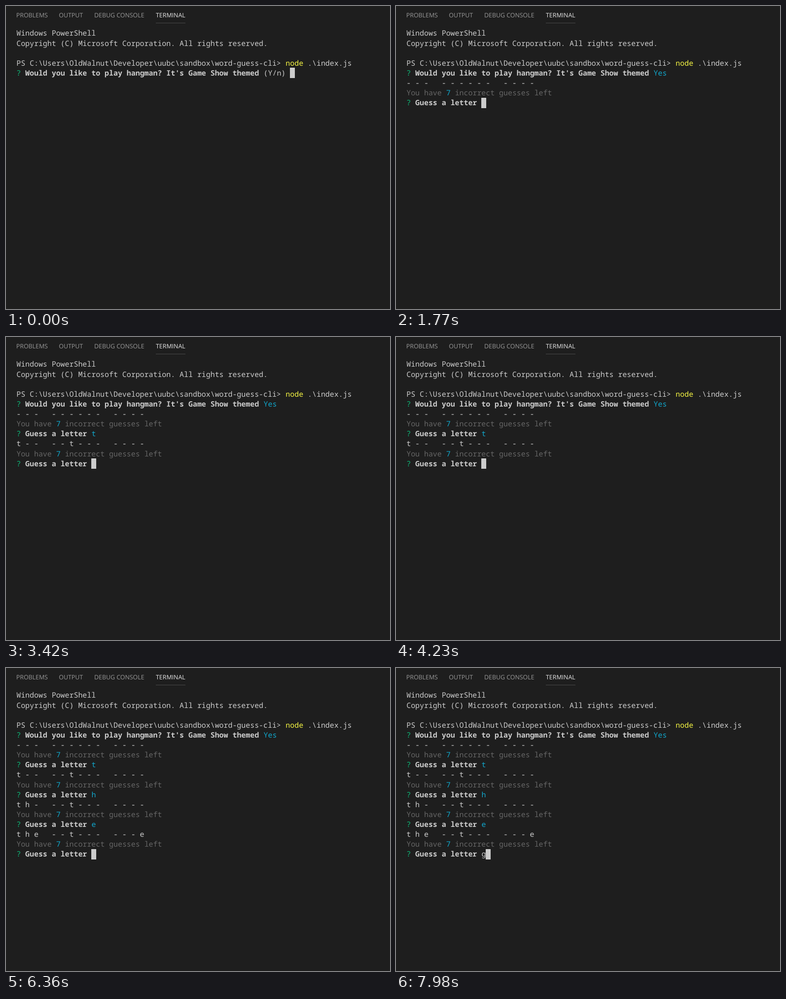
These frames come from a looping animation (779 by 614 pixels, 8 s). An HTML page:

```html
<!DOCTYPE html>
<html lang="en">
<head>
<meta charset="utf-8">
<title>Terminal word game</title>
<style>
  html, body { margin: 0; width: 100%; height: 100%; overflow: hidden; background: #1e1e1e; }
  svg { display: block; width: 779px; height: 614px; }
  text { white-space: pre; fill: #ccc; text-rendering: geometricPrecision; }
  #tabs text { font: 12.4px "Open Sans", "Noto Sans", sans-serif; fill: #989898; }
  #tabs .active { fill: #e7e7e7; }
  #screen text { font: 500 14.92px "Noto Sans Mono", "DejaVu Sans Mono", monospace; }
  #screen .bold { font-weight: 700; }
  #screen .green { fill: #0dbc79; }
  #screen .cyan { fill: #11a8cd; }
  #screen .yellow { fill: #f5f543; }
  #screen .dim { fill: #666; }
</style>
</head>
<body>
<svg viewBox="0 0 779 614">
  <g id="tabs">
    <text x="20.8" y="23">PROBLEMS</text>
    <text x="107.3" y="23">OUTPUT</text>
    <text x="179" y="23">DEBUG CONSOLE</text>
    <text x="304" y="23" class="active">TERMINAL</text>
    <rect x="304" y="34" width="60" height="1" fill="#484848"/>
  </g>
  <g id="screen"></g>
</svg>
<script>
const LOOP = 8000, LEFT = 21.2, TOP = 45.3, COL = 8.953, ROW = 20.13, BASELINE = 15.1;
const screen = document.getElementById('screen');

// Each prompt: the key typed, when it is typed and entered, and the word board above it.
const rounds = [
  { key: 't', typed: 2940, entered: 3150, board: '---|------|----' },
  { key: 'h', typed: 4470, entered: 4680, board: 't--|--t---|----' },
  { key: 'e', typed: 5580, entered: 5790, board: 'th-|--t---|----' },
  { key: 'g', typed: 7770, entered: LOOP, board: 'the|--t---|---e' }
];
const opening = { key: 'y', typed: 330, entered: 540 };

const intro = [
  [['Windows PowerShell']],
  [['Copyright (C) Microsoft Corporation. All rights reserved.']],
  [],
  [['PS C:\\Users\\OldWalnut\\Developer\\uubc\\sandbox\\word-guess-cli> '],
   ['node', 'yellow'], [' .\\index.js']]
];

function add(tag, attrs, content = '') {
  const node = document.createElementNS('http://www.w3.org/2000/svg', tag);
  for (const name in attrs) node.setAttribute(name, attrs[name]);
  node.textContent = content;
  screen.append(node);
}

function prompt(question, hint, answer, step, time) {
  const line = [['? ', 'green'], [question + ' ', 'bold']];
  return time >= step.entered
    ? [...line, [answer, 'cyan']]
    : [...line, [hint + (time >= step.typed ? step.key : '')]];
}

function linesAt(time) {
  const lines = [...intro,
    prompt("Would you like to play hangman? It's Game Show themed", '(Y/n) ', 'Yes', opening, time)];
  let start = opening.entered;
  for (const round of rounds) {
    if (time < start) break;
    const board = round.board.split('|').map(word => [...word].join(' ')).join('   ');
    lines.push(
      [[board]],
      [['You have ', 'dim'], ['7', 'cyan'], [' incorrect guesses left', 'dim']],
      prompt('Guess a letter', '', round.key, round, time));
    start = round.entered;
  }
  return lines;
}

function draw(lines) {
  screen.replaceChildren();
  let col = 0;
  lines.forEach((line, row) => {
    col = 0;
    for (const [content, style = ''] of line) {
      add('text', { x: LEFT + col * COL, y: TOP + row * ROW + BASELINE, class: style }, content);
      col += content.length;
    }
  });
  add('rect', {
    x: Math.floor(LEFT + col * COL), y: Math.floor(TOP + (lines.length - 1) * ROW),
    width: 10, height: 21, fill: '#ccc'
  });
}

const events = [opening, ...rounds].flatMap(step => [step.typed, step.entered]);
const origin = performance.now();
let shown = -1;

function tick() {
  const time = (performance.now() - origin) % LOOP;
  const stage = events.filter(at => at <= time).length;
  if (stage !== shown) {
    shown = stage;
    draw(linesAt(time));
  }
  requestAnimationFrame(tick);
}
tick();
</script>
</body>
</html>
```
